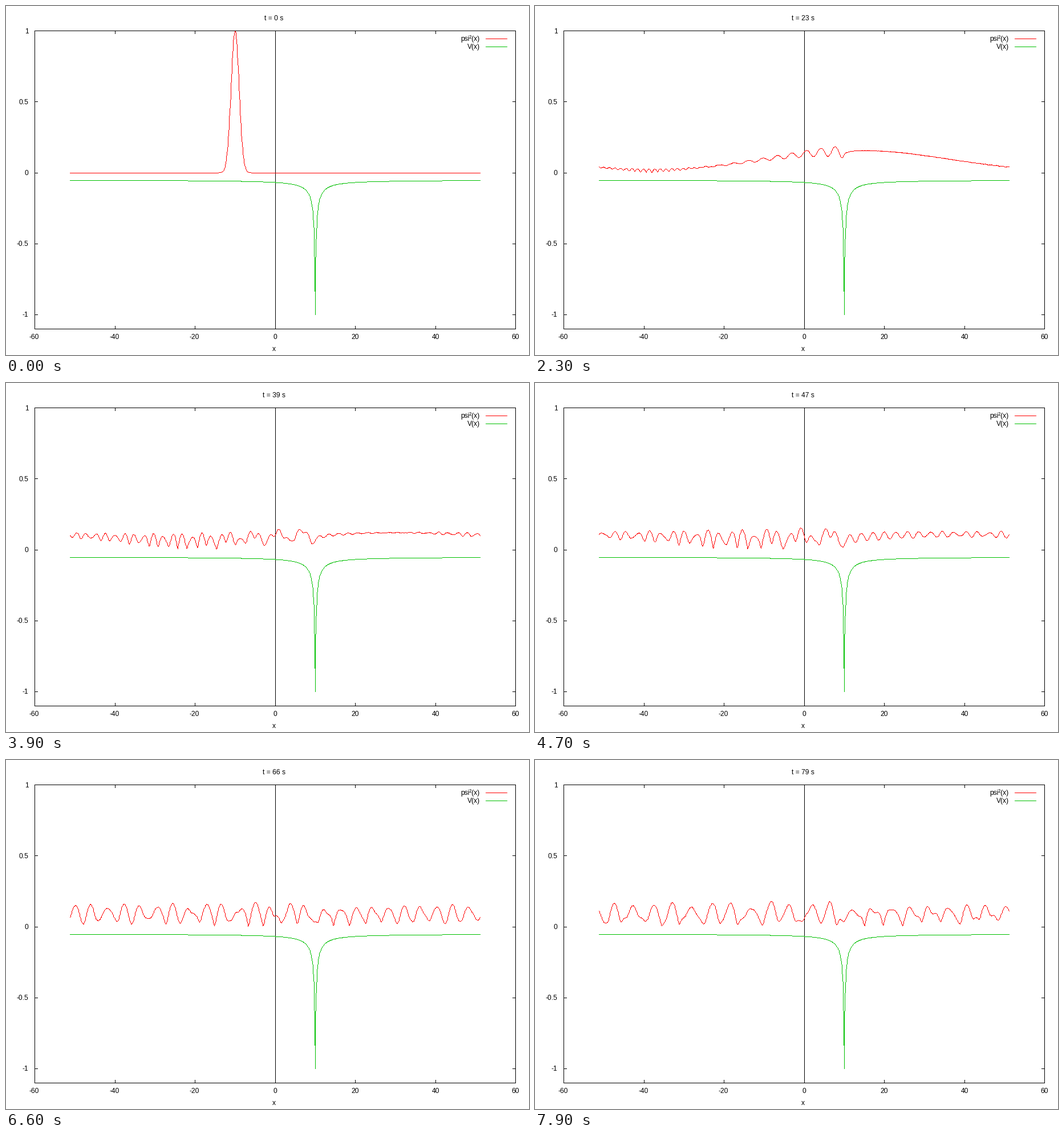
These frames come from a looping animation (917x611 px, 8 s). A matplotlib script:

```python
import numpy as np
import matplotlib.pyplot as plt
from matplotlib.animation import FuncAnimation

W, H, DPI = 917, 611, 100
LEFT, RIGHT, TOP, BOTTOM = 50, 893, 43, 565
FRAMES, INTERVAL = 80, 100
PX = 72 / DPI
RED, GREEN = "#ff0000", "#00c000"

plt.rcParams["font.family"] = "Liberation Sans"
plt.rcParams["font.size"] = 12 * PX
plt.rcParams["path.simplify"] = False


def col(x):
    """Pixel column of a data x."""
    return np.floor(LEFT + (x + 60) * (RIGHT - LEFT) / 120 + 0.5)


def row(y):
    """Pixel row of a data y."""
    return np.floor(TOP + (1 - y) * (BOTTOM - TOP) / 2.1 + 0.5)


def crisp(x, y):
    """One-pixel curve without smoothing, as a run of single-pixel dashes."""
    cols, rows = col(x), row(y)
    steps = np.maximum(np.abs(np.diff(cols)), np.abs(np.diff(rows)))
    s = np.append(0, np.cumsum(steps))
    t = np.arange(s[-1] + 1)
    c = np.floor(np.interp(t, s, cols) + 0.5) + 0.5
    r = np.floor(np.interp(t, s, rows) + 0.5)
    gap = np.full_like(c, np.nan)
    return np.c_[c, c, gap].ravel(), np.c_[r, r + 1, gap].ravel()


# Wave packet in a cusp-shaped well on a periodic grid
N, SPAN = 1024, 102.4
DT, SUBSTEPS = 0.04, 25
x = (np.arange(N) - N // 2) * SPAN / N
k = 2 * np.pi * np.fft.fftfreq(N, SPAN / N)


def well(x):
    return -0.0504 - 0.18 / (np.abs(x - 10) + 0.1895)


def evolve():
    """Modulus of the wave function, one row per second."""
    psi = np.exp(-(x + 10) ** 2 / 2 + 1j * x)
    rows = [np.abs(psi)]
    psi /= np.sqrt(np.sum(np.abs(psi) ** 2) * SPAN / N)
    half = np.exp(-0.5j * DT * well(x))
    drift = np.exp(-0.5j * DT * k ** 2)
    for _ in range(FRAMES - 1):
        for _ in range(SUBSTEPS):
            psi = half * np.fft.ifft(drift * np.fft.fft(half * psi))
        rows.append(np.abs(psi))
    return np.array(rows)


waves = evolve()
waves = np.hstack([waves, waves[:, :1]])
grid = np.append(x, SPAN / 2)

fig = plt.figure(figsize=(W / DPI, H / DPI), dpi=DPI, facecolor="white")
ax = fig.add_axes([0, 0, 1, 1])
ax.set_xlim(0, W)
ax.set_ylim(H, 0)
ax.axis("off")


def stroke(xs, ys, color="black", z=2, cap="butt"):
    return ax.plot(xs, ys, color=color, lw=PX, snap=False, zorder=z,
                   solid_capstyle=cap, solid_joinstyle="miter")[0]


def rule(c0, r0, c1, r1, color="black", z=4):
    """Straight line covering whole pixels from one cell to another."""
    stroke([c0 + 0.5, c1 + 0.5], [r0 + 0.5, r1 + 0.5], color, z, "projecting")


def label(x, y, text, ha="center"):
    return ax.text(x, y, text, ha=ha, va="baseline", color="black")


# Frame, ticks and zero line
for r in (TOP, BOTTOM):
    rule(LEFT, r, RIGHT, r)
for c in (LEFT, RIGHT):
    rule(c, TOP, c, BOTTOM)
rule(col(0), TOP, col(0), BOTTOM, z=1)

for v in range(-60, 61, 20):
    c = col(v)
    rule(c, BOTTOM, c, BOTTOM - 5)
    rule(c, TOP, c, TOP + 5)
    label(c - (1 if v < 0 else 0), 583, str(v))

for v in (-1, -0.5, 0, 0.5, 1):
    r = row(v)
    rule(LEFT, r, LEFT + 5, r)
    rule(RIGHT, r, RIGHT - 5, r)
    label(39.5, r + 4.5, f"{v:g}", "right")

label(469.5, 604, "x")

# Legend
for name, r, color in (("psi²(x)", 57, RED), ("V(x)", 71, GREEN)):
    label(831, r + 4, name, "right")
    rule(841, r, 878, r, color)

title = label(470, 25, "")
wave = stroke([], [], RED, 2)
stroke(*crisp(grid, well(grid)), GREEN, 3)


def draw(i):
    wave.set_data(*crisp(grid, waves[i]))
    title.set_text(f"t = {i} s")
    return wave, title


anim = FuncAnimation(fig, draw, frames=FRAMES, interval=INTERVAL,
                     repeat=True, repeat_delay=0, blit=False)
plt.show()
```
